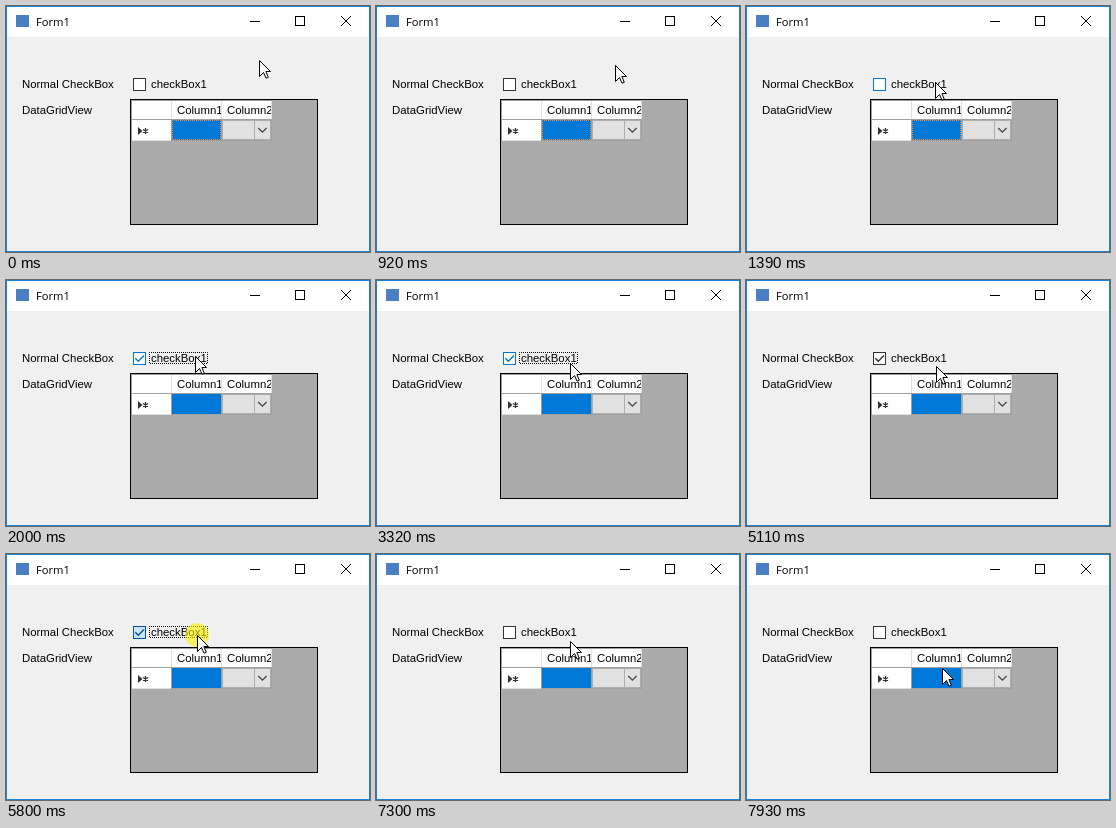
Write an HTML page that moves like this. It is 364x246 px and loops after 8 s.

```html
<!DOCTYPE html>
<html lang="en">
<head>
<meta charset="utf-8">
<title>Form1</title>
<style>
  html, body { margin: 0; width: 100%; height: 100%; overflow: hidden; background: #f0f0f0; }
  svg { display: block; width: 364px; height: 246px; }
  text { font: 11.4px "Liberation Sans", Arial, sans-serif; fill: #000; }
  .title { font: 11.2px "Open Sans", sans-serif; }
  .crisp { shape-rendering: crispEdges; }
  .line { fill: none; stroke: #000; }
  .dots { fill: none; stroke-dasharray: 1 1; stroke-dashoffset: .5; }
</style>
</head>
<body>
<svg viewBox="0 0 364 246">
  <defs>
    <clipPath id="col1"><rect x="166" y="95" width="49" height="18"/></clipPath>
    <clipPath id="col2"><rect x="216" y="95" width="49" height="18"/></clipPath>
  </defs>

  <!-- window -->
  <g class="crisp">
    <rect width="364" height="246" fill="#f0f0f0"/>
    <rect width="364" height="31" fill="#fff"/>
    <rect x=".5" y=".5" width="363" height="245" fill="none" stroke="#1883d7"/>
    <rect x="10" y="9" width="13" height="12" fill="#4a7fc1"/>
    <path class="line" d="M244 15.5h10M289.5 10.5h9v9h-9z"/>
  </g>
  <path class="line" d="M335 10l10 10M345 10l-10 10"/>
  <text class="title" x="30" y="20">Form1</text>

  <text x="16" y="82">Normal CheckBox</text>
  <text x="16" y="108">DataGridView</text>

  <!-- check box -->
  <rect id="box" class="crisp" x="127.5" y="72.5" width="12" height="12"/>
  <path id="tick" d="M129.3 78.3l3 3 5.7-5.8" fill="none" stroke-width="1.4"/>
  <text x="145" y="82">checkBox1</text>
  <rect id="focus" class="dots" x="143.5" y="72.5" width="58" height="11" stroke="#000"/>

  <!-- grid -->
  <g class="crisp">
    <rect x="124.5" y="93.5" width="187" height="125" fill="#ababab" stroke="#000"/>
    <rect x="125" y="94" width="141" height="41" fill="#fff"/>
    <rect id="header" x="166" y="95" width="49" height="18" fill="#d9ebf9"/>
    <path d="M165.5 95v18M215.5 95v18M265.5 95v18M125 134.5h40" stroke="#e0e0e0"/>
    <path d="M125 94.5h141M125.5 94v41M125 113.5h141M165 134.5h101M165.5 114v21M215.5 114v21M265.5 114v21" stroke="#a0a0a0"/>
    <rect x="166" y="114" width="49" height="20" fill="#0078d7"/>
    <rect x="216.5" y="114.5" width="48" height="19" fill="#e1e1e1" stroke="#adadad"/>
    <path d="M248.5 115v18" stroke="#adadad"/>
  </g>
  <rect id="cell" class="dots" x="166.5" y="114.5" width="48" height="19" stroke="#ff8728"/>
  <path d="M252.2 122l4.2 4.2 4.2-4.2" fill="none" stroke="#444" stroke-width="1.3"/>
  <path d="M132 121l4.5 4-4.5 4z" fill="#333"/>
  <path d="M139.5 122v6M136.9 123.5l5.2 3M136.9 126.5l5.2-3" stroke="#333" stroke-width="1.3"/>
  <text x="171" y="108" clip-path="url(#col1)">Column1</text>
  <text x="221" y="108" clip-path="url(#col2)">Column2</text>

  <!-- pointer -->
  <g id="pointer">
    <circle id="halo" r="12" fill="#fff000" fill-opacity=".6"/>
    <path d="M.5 .5V16.5L4.5 12.5 7 18.2 9.3 17.3 6.9 11.5H11.5z" fill="#fff" stroke="#000"/>
  </g>
</svg>
<script>
const LOOP = 8000, STEP = 76;
const $ = id => document.getElementById(id);
const [box, tick, focus, header, cell, pointer, halo] =
  ["box", "tick", "focus", "header", "cell", "pointer", "halo"].map($);

// Pointer moves, each eased in steps from the last resting place
const home = { x: 253, y: 54 };
const moves = [
  { at: 700, ms: 690, x: 189, y: 76 },
  { at: 2470, ms: 160, x: 194, y: 82 },
  { at: 3320, ms: 90, x: 194, y: 84 },
  { at: 4190, ms: 0, x: 191, y: 84 },
  { at: 4410, ms: 160, x: 189, y: 84 },
  { at: 5110, ms: 150, x: 192, y: 92 },
  { at: 5410, ms: 90, x: 192, y: 84 },
  { at: 5650, ms: 150, x: 191, y: 80 },
  { at: 5890, ms: 320, x: 194, y: 87 },
  { at: 7750, ms: 180, x: 196, y: 114 }
];

const smooth = p => p * p * (3 - 2 * p);
const within = (t, ...spans) => spans.some(([a, b]) => t >= a && t < b);
const show = (el, on) => el.setAttribute("visibility", on ? "visible" : "hidden");

function pointerAt(t) {
  let { x, y } = home;
  for (const m of moves) {
    if (t < m.at) break;
    const steps = Math.round(m.ms / STEP) + 1;
    const done = Math.min(steps, Math.floor((t - m.at) / STEP) + 1);
    const e = smooth(done / steps);
    x = Math.round(x + (m.x - x) * e);
    y = Math.round(y + (m.y - y) * e);
  }
  return { x, y };
}

function draw(t) {
  const { x, y } = pointerAt(t);
  const pressed = within(t, [1850, 2000], [5730, 5890]);
  const hover = x >= 125 && x < 204 && y >= 70 && y < 86;
  const edge = pressed ? "#005499" : hover ? "#0078d7" : "#333";

  box.setAttribute("stroke", edge);
  box.setAttribute("fill", pressed ? "#cce4f7" : "#fff");
  tick.setAttribute("stroke", edge);
  show(tick, within(t, [2000, 5890]));
  show(focus, within(t, [1850, 3870], [5730, 7300]));
  show(cell, t < 1850);
  show(header, x >= 166 && x < 216 && y >= 94 && y < 114);
  show(halo, pressed);
  pointer.setAttribute("transform", `translate(${x} ${y})`);
}

const start = performance.now();
function loop() {
  draw((performance.now() - start) % LOOP);
  requestAnimationFrame(loop);
}
loop();
</script>
</body>
</html>
```
